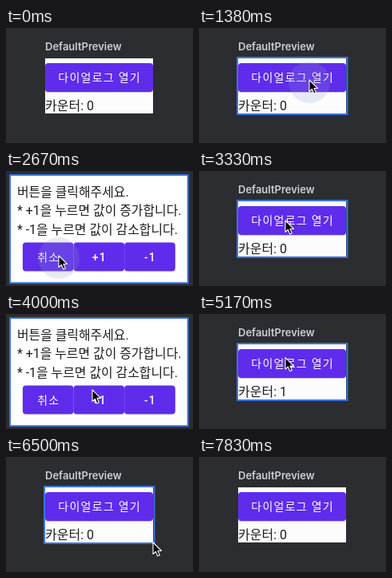
An HTML page that plays this animation: 234 px wide and 144 px high, repeating every 8.88 s.

```html
<!DOCTYPE html>
<html lang="ko">
<head>
<meta charset="utf-8">
<title>DefaultPreview</title>
<style>
  html, body { margin: 0; height: 100%; overflow: hidden; background: #2b2d30; }
  svg { display: block; width: 100vw; height: 100vh; }
  text { font: 16px Roboto, "Noto Sans CJK KR", "Noto Sans CJK", sans-serif; fill: #1e1e1e; white-space: pre; }
  .title { font: 600 13px Inter, sans-serif; fill: #ced0d6; }
  .label { font-size: 14px; letter-spacing: 1.25px; text-anchor: middle; fill: #fff; }
  .button { fill: #5f2cec; filter: drop-shadow(0 1px .7px rgba(0, 0, 0, .2)); }
  .outline { stroke: #3b72e0; stroke-width: 2; }
</style>
</head>
<body>
<svg viewBox="0 0 234 144">
  <g id="preview">
    <text class="title" x="49" y="28">DefaultPreview</text>
    <rect x="49" y="38" width="135" height="69" fill="#fcfcfc"/>
    <text id="counter" x="49" y="102.5"></text>
    <rect id="hover" class="outline" x="48" y="37" width="137.5" height="71" fill="none"/>
  </g>
  <g id="dialog" transform="translate(5 5) scale(.994)">
    <rect class="outline" width="224" height="136" fill="#fff"/>
  </g>
  <circle id="ripple" fill="#8c9bc4" fill-opacity=".2"/>
  <path id="cursor" d="M0 0V14.5L3.4 11.4L5.7 17L8.3 15.9L6 10.5H10.5Z"
        stroke="#fff" stroke-width="1.1" stroke-linejoin="round"/>
</svg>
<script>
const LOOP = 8880, STEP = 1000 / 24;
const ENTER = 17, HOVER = 24, LEAVE = 187;
const TRAVEL = 0.6;       // share of a visit spent moving
const RIPPLE_STEPS = 3;   // steps a click shows before it takes effect

const el = id => document.getElementById(id);
const show = (id, on) => el(id).setAttribute("visibility", on ? "visible" : "hidden");

function add(parent, tag, attributes, content = "") {
  const node = document.createElementNS("http://www.w3.org/2000/svg", tag);
  for (const [name, value] of Object.entries(attributes)) node.setAttribute(name, value);
  node.textContent = content;
  el(parent).append(node);
}

function addButton(parent, x, y, width, label) {
  add(parent, "rect", { class: "button", x, y, width, height: 36, rx: 4 });
  const weight = /\d/.test(label) ? 500 : 400;
  add(parent, "text", { class: "label", x: x + width / 2 + 0.6, y: y + 23.4, "font-weight": weight,
    style: `font-weight: ${weight}` }, label);
}

addButton("preview", 49, 44, 135, "다이얼로그 열기");
["버튼을 클릭해주세요.", "* +1을 누르면 값이 증가합니다.", "* -1을 누르면 값이 감소합니다."]
  .forEach((line, i) => add("dialog", "text", { x: 9, y: 27.2 + 23.6 * i }, line));
["취소", "+1", "-1"].forEach((label, i) => addButton("dialog", 16 + 64 * i, 85, 64, label));

// The cursor sets off at `start`, reaches its point and clicks at `click`
const entry = { x: 157, y: 115 };
const visits = [
  { start: 21, click: 34, x: 138, y: 65 },
  { start: 46, click: 65, x: 66, y: 106 },
  { start: 71, click: 85, x: 108, y: 62 },
  { start: 89, click: 107, x: 108, y: 108, adds: 1 },
  { start: 117, click: 130, x: 108, y: 53 },
  { start: 134, click: 156, x: 184, y: 107, adds: -1 }
];

function cursorAt(step) {
  let { x, y } = entry;
  for (const visit of visits) {
    const p = (step - visit.start) / (visit.click - visit.start) / TRAVEL;
    const t = Math.min(Math.max(p, 0), 1), ease = t * t * (3 - 2 * t);
    x += (visit.x - x) * ease;
    y += (visit.y - y) * ease;
  }
  return { x, y };
}

function draw(time) {
  const step = Math.floor((time % LOOP + 4) / STEP);
  const { x, y } = cursorAt(step);
  const done = visits.filter(visit => step >= visit.click);
  const open = done.length % 2 === 1;
  const next = visits[done.length];
  const age = next ? step - next.click + RIPPLE_STEPS : -1;

  show("dialog", open);
  show("preview", !open);
  show("hover", !open && step >= HOVER && step <= LEAVE);
  show("cursor", step >= ENTER && step < LEAVE);
  show("ripple", age >= 0);
  el("counter").textContent = "카운터: " + done.reduce((sum, { adds = 0 }) => sum + adds, 0);
  el("cursor").setAttribute("transform", `translate(${x} ${y})`);
  el("ripple").setAttribute("transform", `translate(${x} ${y + 3})`);
  el("ripple").setAttribute("r", Math.max(0, 10 + 8 * age));
}

const start = performance.now();
function tick() {
  draw(performance.now() - start);
  requestAnimationFrame(tick);
}
tick();
</script>
</body>
</html>
```
